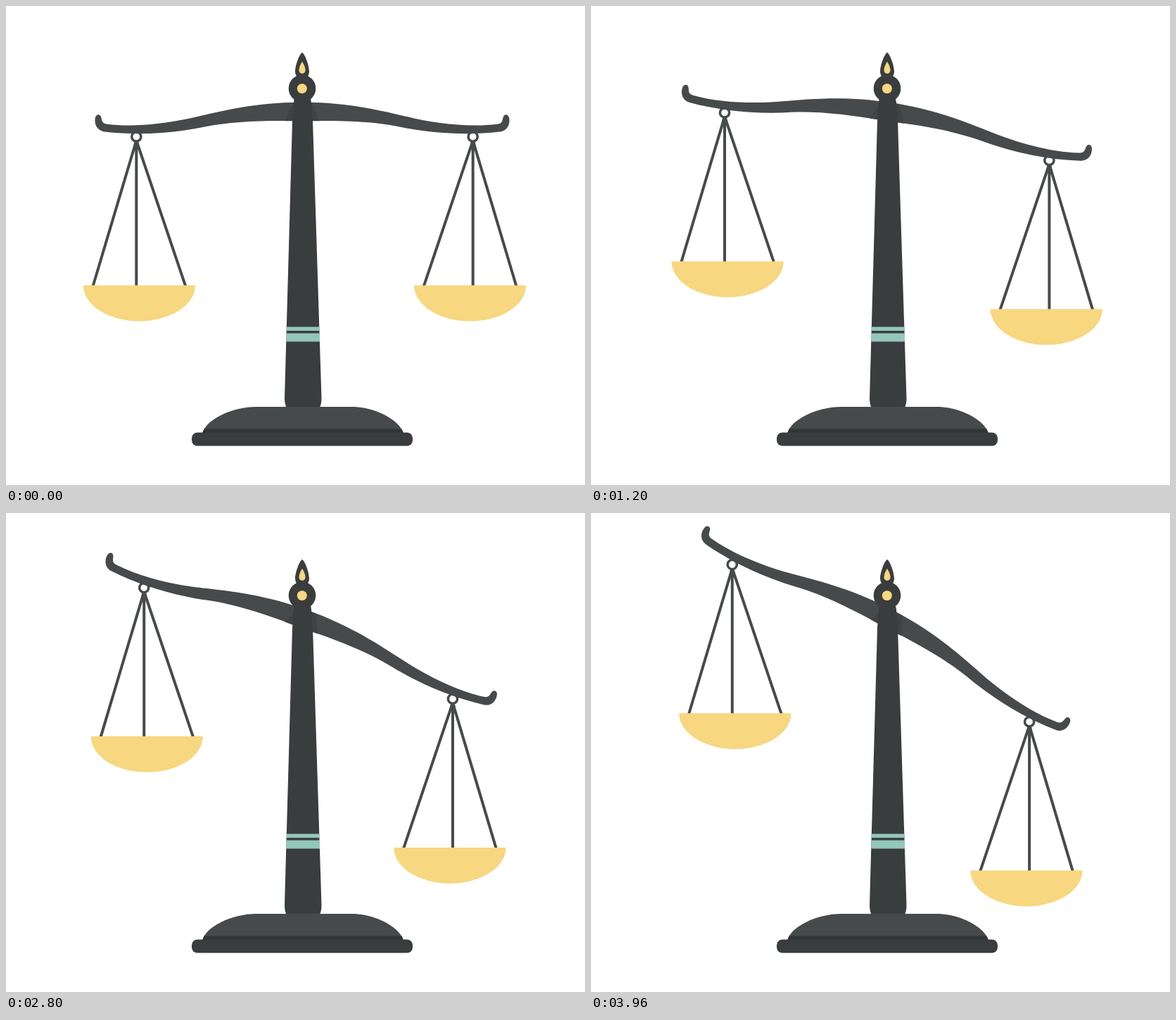
Animation, 823 px wide and 680 px high, one loop 4000 ms. Source, as an HTML page:

```html
<!DOCTYPE html>
<html lang="en">
<head>
<meta charset="utf-8">
<title>Tipping scales</title>
<style>
  html, body { margin: 0; width: 100%; height: 100%; overflow: hidden; background: #fff; }
  svg { display: block; width: 100%; height: 100%; }
  .dark { fill: #393d3d; }
  .mid { fill: #474a4a; }
  .gold { fill: #f7d77f; }
  .teal { fill: #93c7b9; }
  .wire { fill: none; stroke: #474a4a; stroke-width: 4; }
</style>
</head>
<body>
<svg viewBox="0 0 823 680">
  <defs>
    <g id="pan">
      <path class="wire" d="M185.3 191 L123.5 398 M185.3 191 V398 M185.3 191 L255.3 398"/>
      <path class="mid" d="M182.5 192 H188 L190 203 H180.5 Z"/>
      <circle class="wire" cx="185.3" cy="185.5" r="6.6" style="stroke-width:3.5"/>
      <path class="gold" d="M109.8 396.5 H269 A79.6 51 0 0 1 109.8 396.5 Z"/>
    </g>
    <path id="arm" class="mid" d="M422 136.7 C360 136 310 148 270 157.5 C235 166 185 173 144 167.8
      C136 167 136.500 162 135.300 158 C134 152.800 128 153 126.800 159 C125 168 130 177.500 140 178.500
      C185 183.700 235 181.500 285 171 C320 164 365 162 422 163.300 Z"/>
  </defs>

  <g id="left"><use href="#pan"/></g>
  <g id="right"><use href="#pan" transform="translate(849 0) scale(-1 1)"/></g>

  <g id="beam">
    <use href="#arm"/>
    <use href="#arm" transform="translate(842 0) scale(-1 1)"/>
    <path fill="#404343" d="M409 137 H433.500 L446 163.200 H396.500 Z"/>
  </g>

  <path class="dark" d="M410 126 H432 L434 137 L436 163 L448.500 557 Q448.500 565 445.500 571
    H399 Q396 565 396 557 L407 163 L409 137 Z"/>
  <rect class="teal" x="398.500" y="455.500" width="47.300" height="5.600"/>
  <rect class="teal" x="398.300" y="464.600" width="47.700" height="11.900"/>

  <path class="dark" d="M421 66 C417 68 411 85 411 93 C411 97 413 99 414 103 H428
    C429 99 431 97 431 93 C431 85 425 68 421 66 Z"/>
  <path class="gold" d="M421 79 C419.500 81 416.500 87 416.500 91 C416.500 97.500 425.500 97.500 425.500 91
    C425.500 87 422.500 81 421 79 Z"/>
  <circle class="dark" cx="421" cy="117" r="19.300"/>
  <circle class="gold" cx="420.800" cy="117.200" r="7"/>

  <path class="mid" d="M279 607 C283 588 320 569 356 569 H491 C525 569 560 588 565 607 Z"/>
  <path fill="#313535" d="M281.500 600.500 H562.500 L565 607 H279 Z"/>
  <rect class="dark" x="264" y="605.500" width="314" height="19" rx="8"/>
</svg>
<script>
  const LOOP = 4000;
  const MAX_TILT = 28.2;
  const [beam, left, right] = ["beam", "left", "right"].map(id => document.getElementById(id));
  const shift = (el, x, y) => el.setAttribute("transform", `translate(${x} ${y})`);

  // Everything tips at constant speed, then snaps back to level.
  function draw(ms) {
    const p = (ms % LOOP) / LOOP;
    beam.setAttribute("transform", `rotate(${MAX_TILT * p} 421 159)`);
    shift(left, 15.6 * p, -113.4 * p);
    shift(right, -41 * p, 112 * p);
  }

  function tick() {
    draw(performance.now());
    requestAnimationFrame(tick);
  }
  tick();
</script>
</body>
</html>
```
